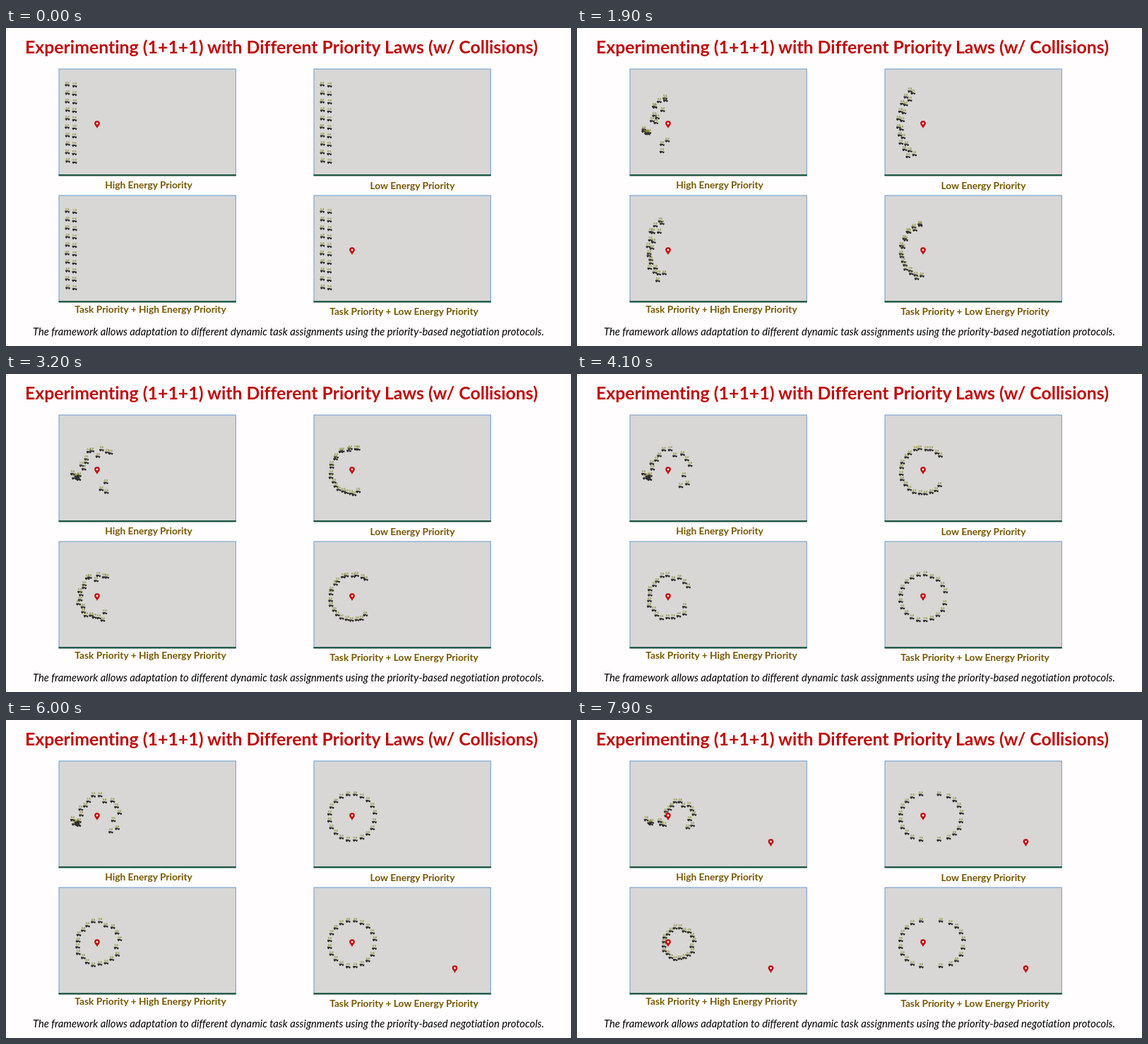
An HTML page that plays this animation: 800x450 px, repeating every 8 s.

```html
<!DOCTYPE html>
<html lang="en">
<head>
<meta charset="utf-8">
<title>Priority laws</title>
<style>
  html, body { margin: 0; width: 100%; height: 100%; overflow: hidden; background: #fffdfe; }
  svg { display: block; width: 800px; height: 450px; }
  text { font-family: Lato, Carlito, sans-serif; text-anchor: middle; font-variant-ligatures: none; }
  .title { font-size: 24.85px; font-weight: 700; fill: #c00b0b; }
  .label { font-size: 13.75px; font-weight: 700; fill: #765800; }
  .note { font-size: 14.75px; font-style: italic; fill: #000; }
  .tag { font-size: 3.8px; font-weight: 700; fill: #85851c; }
</style>
</head>
<body>
<svg id="stage" viewBox="0 0 800 450">
  <defs>
    <g id="arena">
      <rect width="250.3" height="150" fill="#d8d7d6" stroke="#6c9bcb"/>
      <path d="M-.5 150.3H250.8" stroke="#15503a" stroke-width="2.2"/>
    </g>
    <g id="robot">
      <text class="tag" y="-2">0.8</text>
      <path d="M-3.3 -1.1H1V-.4H3.3V1.1H-3.3Z" fill="#35352f"/>
      <circle cx="-1.7" cy="1.2" r="1" fill="#222"/>
      <circle cx="2" cy="1.2" r="1" fill="#222"/>
    </g>
    <g id="pin">
      <path d="M0 5.5C-1.2 2.6 -3.9 1 -3.9 -1.4A3.9 3.9 0 0 1 3.9 -1.4C3.9 1 1.2 2.6 0 5.5Z" fill="#c40d0d"/>
      <circle cy="-1.4" r="1.5" fill="#f4e4e2"/>
    </g>
  </defs>
  <text class="title" x="390" y="36">Experimenting (1+1+1) with Different Priority Laws (w/ Collisions)</text>
  <text class="label" x="202" y="227">High Energy Priority</text>
  <text class="label" x="575.5" y="228">Low Energy Priority</text>
  <text class="label" x="204.5" y="403">Task Priority + High Energy Priority</text>
  <text class="label" x="563.5" y="406">Task Priority + Low Energy Priority</text>
  <text class="note" x="400" y="434.5">The framework allows adaptation to different dynamic task assignments using the priority-based negotiation protocols.</text>
</svg>
<script>
const LOOP = 8000, STEP = 100, COUNT = 20;
const CENTER = { x: 54, y: 80 }, RADIUS = 33;

const mix = (a, b, k) => a + (b - a) * k;
const clamp = k => Math.min(1, Math.max(0, k));
const smooth = k => (k = clamp(k), k * k * (3 - 2 * k));
function random(i, salt) {
  const n = Math.sin(i * 12.9898 + salt * 78.233) * 43758.5453;
  return n - Math.floor(n);
}

// Robots close in from two columns, spread around the pin, then head for the second one.
// crowd: how far they cut inside the ring; jam: how many get stuck on the left;
// follow: the whole swarm moves on instead of only its right half.
function place({ start, leave, crowd, jam, follow }, i, t) {
  const side = i % 2, row = i >> 1;
  const x0 = 11.5 + 10 * side + random(i, 1) - CENTER.x;
  const y0 = 22.5 + 12 * row + 1.5 * side - CENTER.y;
  const close = smooth((t - start) / 2600);
  const turn = clamp((t - start) / 4200);
  const go = smooth((t - leave) / 1900);

  if (i >= COUNT / 2 && i < COUNT / 2 + jam) {
    const x = mix(x0, -37 + 12 * random(i, 2), close) + go * 30 * random(i, 3);
    return [CENTER.x + x, CENTER.y + mix(y0, 3 + 11 * random(i, 4), close)];
  }

  // Angles count from the left of the pin, negative above it.
  const slot = (2 * i / (COUNT - 1) - 1) * Math.PI * .94;
  const angle = mix(Math.atan2(y0, -x0), slot, turn ** 1.7);
  const cut = crowd * random(i, 5) * close * mix(1, crowd / 2, turn);
  const radius = mix(Math.hypot(x0, y0), RADIUS, close) * (1 - cut) * (1 - .3 * follow * go);
  const right = -Math.cos(angle);
  const shift = follow ? 15 : 25 * smooth((right + .3) / .6);
  return [CENTER.x + radius * right + shift * go, CENTER.y + radius * Math.sin(angle)];
}

const stage = document.getElementById('stage');
function add(parent, name, attrs) {
  const node = document.createElementNS('http://www.w3.org/2000/svg', name);
  for (const key in attrs) node.setAttribute(key, attrs[key]);
  return parent.appendChild(node);
}
const move = (node, x, y) => node.setAttribute('transform', `translate(${x.toFixed(2)} ${y.toFixed(2)})`);

function panel(x, y, law) {
  const g = add(stage, 'g', { transform: `translate(${x} ${y})` });
  add(g, 'use', { href: '#arena' });
  const robots = Array.from({ length: COUNT }, () => add(g, 'use', { href: '#robot' }));
  const pins = [[54, 78.5, law.start], [199.5, 115.5, law.leave]].map(([px, py, from]) => {
    const node = add(g, 'use', { href: '#pin' });
    move(node, px, py);
    return { node, from };
  });
  return { law, robots, pins };
}

const panels = [
  panel(75, 58, { start: 0, leave: 6300, crowd: .8, jam: 7, follow: 1 }),
  panel(436, 58, { start: 600, leave: 6400, crowd: .25, jam: 0, follow: 0 }),
  panel(75, 237, { start: 300, leave: 6300, crowd: .6, jam: 0, follow: 1 }),
  panel(436, 237, { start: 0, leave: 6000, crowd: .25, jam: 0, follow: 0 })
];

function draw(now) {
  const t = Math.floor(now % LOOP / STEP) * STEP;
  for (const { law, robots, pins } of panels) {
    robots.forEach((robot, i) => move(robot, ...place(law, i, t)));
    for (const { node, from } of pins) node.setAttribute('visibility', t >= from ? 'visible' : 'hidden');
  }
  requestAnimationFrame(() => draw(performance.now()));
}
draw(performance.now());
</script>
</body>
</html>
```
